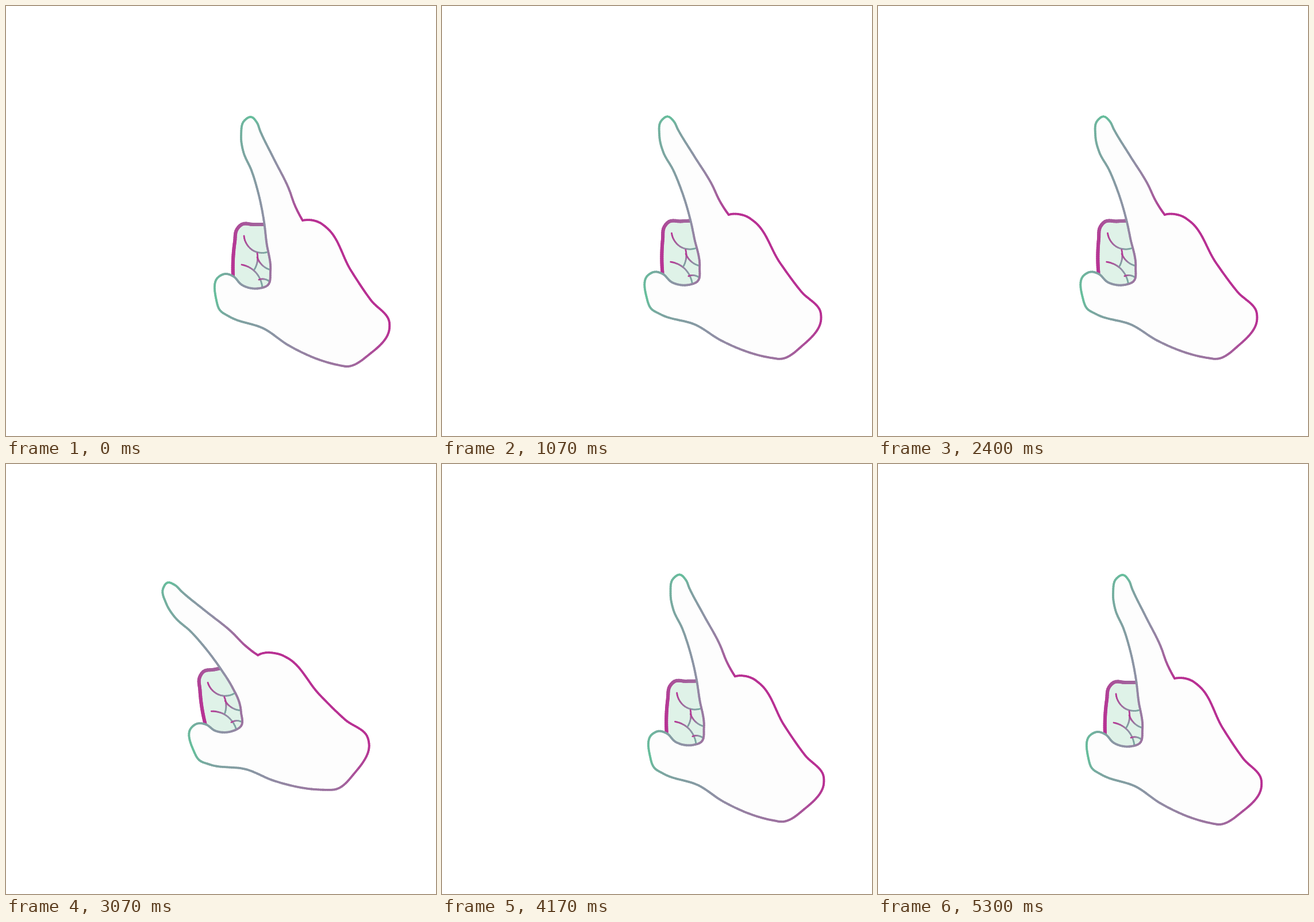
Recreate the animation shown at these times as an HTML page with a canvas. Size 748 by 748 pixels, loop 5430 ms.

```html
<!DOCTYPE html>
<html lang="en">
<head>
<meta charset="utf-8">
<title>Tapping hand</title>
<style>
  html, body { margin: 0; width: 100%; height: 100%; overflow: hidden; background: #fff; }
  canvas { display: block; width: 100vw; height: 100vh; }
</style>
</head>
<body>
<canvas id="stage" width="748" height="748"></canvas>
<script>
const ctx = document.getElementById('stage').getContext('2d');

const mix = (a, b, t) => a + (b - a) * t;
const clamp = t => Math.min(1, Math.max(0, t));
const ease = t => (1 - Math.cos(Math.PI * clamp(t))) / 2;
const rad = deg => deg * Math.PI / 180;

// Points of a stretch "x,y x,y ..." whose tint runs from one value to another
function stretch(from, to, text) {
  const list = text.split(' ');
  return list.map((p, i) => [...p.split(',').map(Number), mix(from, to, i / Math.max(1, list.length - 1))]);
}

// Smooth curve through points [x, y, tint]; tangents follow the circle through neighbours
function curve(p) {
  const last = p.length - 1;
  const chord = i => {
    const x = p[i + 1][0] - p[i][0], y = p[i + 1][1] - p[i][1], len = Math.hypot(x, y);
    return { x: x / len, y: y / len, len };
  };
  const inner = i => {
    const a = chord(i - 1), b = chord(i);
    const x = a.x * b.len + b.x * a.len, y = a.y * b.len + b.y * a.len, d = Math.hypot(x, y);
    return [x / d, y / d];
  };
  const mirror = (c, [x, y]) => {
    const dot = 2 * (c.x * x + c.y * y);
    return [dot * c.x - x, dot * c.y - y];
  };
  const tangent = i => i === 0 ? mirror(chord(0), inner(1))
    : i === last ? mirror(chord(last - 1), inner(last - 1)) : inner(i);

  const out = [p[0]];
  for (let i = 0; i < last; i++) {
    const a = p[i], b = p[i + 1], m = tangent(i), n = tangent(i + 1), { len } = chord(i);
    const steps = Math.max(3, Math.ceil(len / 4));
    for (let j = 1; j <= steps; j++) {
      const t = j / steps, u = 1 - t;
      const at = k => u * u * (1 + 2 * t) * a[k] + t * t * (3 - 2 * t) * b[k]
        + len * t * u * (u * m[k] - t * n[k]);
      out.push([at(0), at(1), mix(a[2], b[2], t)]);
    }
  }
  return out;
}

// The raised hand; tint 0 is green, 1 is magenta
const hand = curve([
  ...stretch(1, .1, '516,373 503,348 492,318 465,264 442,217 436,202'),
  ...stretch(0, .65, '426,193 415,199 409,225 413,254 427,286 438,322 449,376 453,410 460,461'),
  ...stretch(.65, .1, '455,486 441,491 410,485 395,470 381,466 370,471'),
  ...stretch(0, .65, '366,512 372,529 388,540 450,562 491,590 580,625'),
  ...stretch(.65, 1, '592,627 632,606 667,561'),
  ...stretch(1, 1, '667,551 635,512 600,460 557,385 546,377 516,373')
]);
const fist = curve(stretch(1, .7, '395,470 398,410 402,388 410,380 430,380 455,380'));
const fistInside = stretch(0, 0, '475,400 470,480 440,500 400,482');
const creases = [
  '414,400 431,426 455,428', '437,430 437,446 431,460', '437,437 447,452 460,459',
  '410,450 431,460 446,491', '440,476 449,475 458,479'
].map(c => curve(stretch(1, .2, c)));

function turn([x, y], [cx, cy], angle) {
  const c = Math.cos(angle), s = Math.sin(angle);
  return [cx + (x - cx) * c - (y - cy) * s, cy + (x - cx) * s + (y - cy) * c];
}

// The whole hand swings from below while drifting a little
function swing(p, s) {
  const arc = s * (1 - s);
  const [x, y] = turn([p[0] + 4 * s, p[1] - s], [286, 682], rad(-20 * s));
  return [x - 21 * arc, y + 6 * arc, p[2]];
}

// The finger also bends at its base, fading out into the palm
function bend(p, s) {
  const weight = ease((545 - p[0]) / 35) * ease((470 - p[1]) / 100);
  return [...turn(p, [503, 405], rad(-22 * s * weight)), p[2]];
}

const GREEN = [102, 191, 156], GREY = [144, 143, 165], MAGENTA = [184, 48, 147];
function tintColor(t) {
  const [a, b, f] = t < .5 ? [GREEN, GREY, t * 2] : [GREY, MAGENTA, t * 2 - 1];
  return `rgb(${a.map((v, i) => Math.round(mix(v, b[i], f)))})`;
}

function fill(points, color) {
  ctx.fillStyle = color;
  ctx.beginPath();
  points.forEach(p => ctx.lineTo(p[0], p[1]));
  ctx.fill();
}

function line(a, b, width, color) {
  ctx.lineWidth = width;
  ctx.strokeStyle = color;
  ctx.beginPath();
  ctx.moveTo(a[0], a[1]);
  ctx.lineTo(b[0], b[1]);
  ctx.stroke();
}

function stroke(points, width) {
  for (let i = 1; i < points.length; i++)
    line(points[i - 1], points[i], width, tintColor((points[i - 1][2] + points[i][2]) / 2));
}

// Eight rays fly outward and shorten, n poses after the tap
function drawRays(n) {
  const center = [211, 253.5], outer = 128 - 68 * .33 ** n, inner = 29 + 23 * n;
  for (let i = 0; i < 8; i++) {
    const end = r => turn([center[0] - 2, center[1] - r], center, i * Math.PI / 4);
    line(end(inner), end(outer), 12, '#00aaff');
  }
}

// One tap is 17 poses of 80 ms, shown on a 30 fps clock
const LOOP = 5430, TICK = 100 / 3, POSE = 80, POSES = 17, TAP = 7, REST = 15;

function draw(pose) {
  const s = ease(pose <= TAP ? pose / 7.2 : (REST - pose) / 8.6);
  const swung = points => points.map(p => swing(p, s));
  ctx.fillStyle = '#fff';
  ctx.fillRect(0, 0, 748, 748);
  ctx.lineCap = 'round';
  if (pose >= TAP && pose < TAP + 5) drawRays(pose - TAP);

  fill(swung([...fist, ...fistInside]), '#dff2e8');
  creases.forEach(c => stroke(swung(c), 2.8));
  stroke(swung(fist), 6);

  const outline = swung(hand.map(p => bend(p, s)));
  fill(outline, '#fdfdfd');
  stroke(outline, 3.8);
}

const start = performance.now();
let shown = -1;
function frame() {
  const t = (performance.now() - start) % LOOP;
  const tick = Math.floor((t + 5) / TICK);
  const pose = Math.floor(tick * TICK / POSE + 1e-6) % POSES;
  if (pose !== shown) draw(shown = pose);
  requestAnimationFrame(frame);
}
frame();
</script>
</body>
</html>
```
